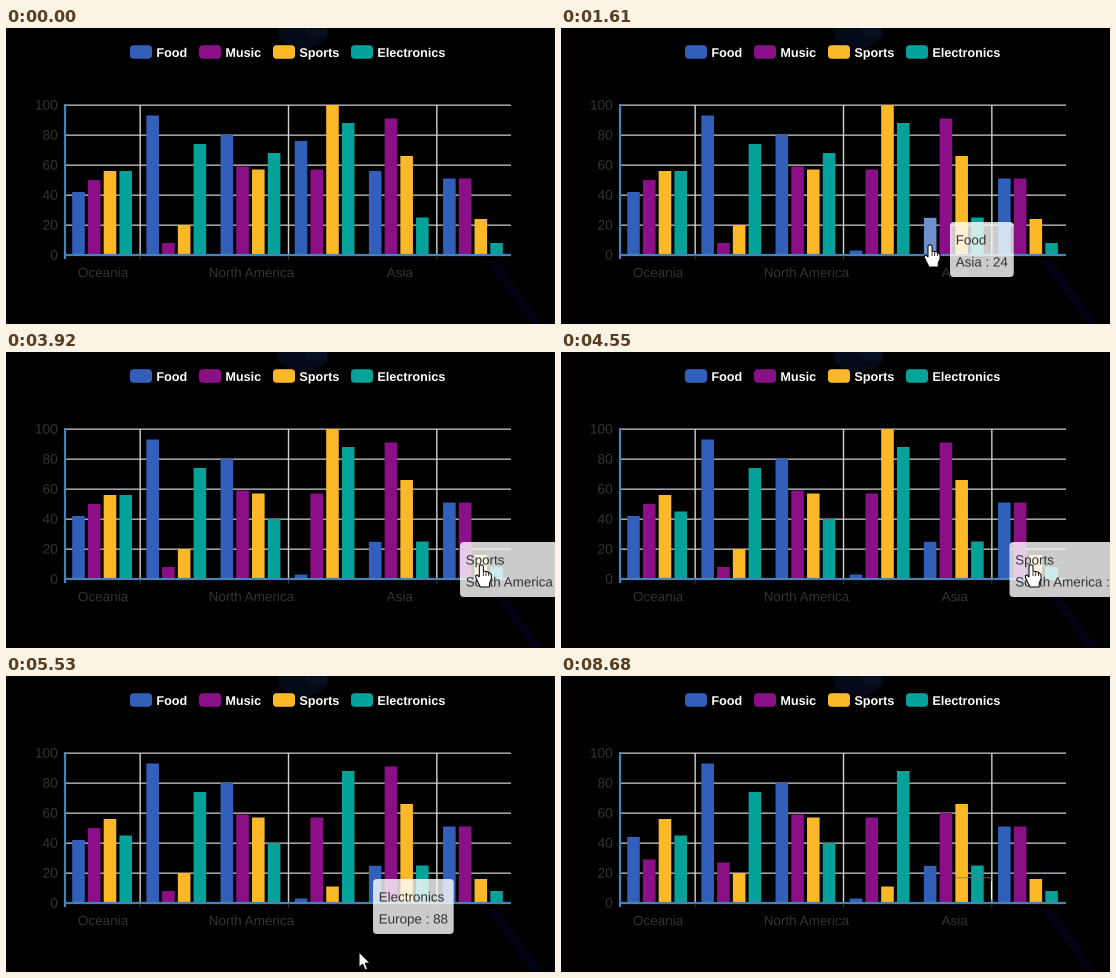
Write a matplotlib script that moves like this. It is 549 by 296 pixels and loops after 8890 ms.

```python
import matplotlib.pyplot as plt
import numpy as np
from matplotlib.animation import FuncAnimation
from matplotlib.colors import to_rgb
from matplotlib.patches import FancyBboxPatch, PathPatch, Polygon, Rectangle
from matplotlib.path import Path
from matplotlib.textpath import TextPath

W, H, DPI = 549, 296, 72          # at 72 dpi a point is a pixel
STEP, LOOP = 70, 8890
plt.rcParams["toolbar"] = "None"

SERIES = ["Food", "Music", "Sports", "Electronics"]
COLORS = ["#315fba", "#8b0f87", "#fcb826", "#04a299"]
SALES = {
    "Oceania": [42, 50, 56, 56],
    "Africa": [93, 8, 20, 74],
    "North America": [80, 59, 57, 68],
    "Europe": [76, 57, 100, 88],
    "Asia": [56, 91, 66, 25],
    "South America": [51, 51, 24, 8],
}
REGIONS = list(SALES)

# one value changes at every beat: region, series, new value
FIRST_BEAT, BEAT = 616, 895
UPDATES = [
    ("Asia", 0, 24.8), ("Europe", 0, 3), ("South America", 2, 16),
    ("North America", 3, 40), ("Oceania", 3, 45), ("Europe", 2, 11),
    ("Africa", 1, 27), ("Oceania", 0, 44), ("Oceania", 1, 29), ("Asia", 1, 60),
]

# stops of the pointer on each visit: time, x, y
VISITS = [
    np.array([
        (910, 438, 291), (1050, 434, 266), (1120, 434, 266), (1470, 381, 222),
        (1540, 369, 217), (3220, 369, 217), (3850, 475.5, 213), (4480, 470, 213),
        (4550, 470, 213), (4970, 347, 226), (5530, 353, 276), (5740, 353, 276),
    ]),
    np.array([(7770, 471, 289), (8190, 432, 240), (8400, 430, 204)]),
]
TIP_HIDE = 5670

LEFT, RIGHT, BASE, TOP = 60, 505, 227, 77
BAND = (RIGHT - LEFT) / len(REGIONS)
BAR_STEP = BAND * 0.8 / 3.77
BAR_W = BAR_STEP * 0.8
TIP_H, PAD = 55, 6

ARROW = [(0, 0), (0, 15.5), (3.6, 12.2), (6.2, 18), (8.6, 17), (6.2, 11.2), (11, 11)]
HAND = [(-1, 0), (1, 0), (2, 1), (2, 6), (7, 7), (10, 9.5), (10, 14), (8.2, 18),
        (8.2, 22), (-1, 22), (-5.4, 13), (-5.6, 10.5), (-4, 10), (-2, 12), (-2, 1)]


def bar_x(region, series):
    return LEFT + 6.2 + region * BAND + series * BAR_STEP


def value_y(value):
    return BASE - value * (BASE - TOP) / 100


def values_at(t):
    data = [list(row) for row in SALES.values()]
    for k, (region, series, value) in enumerate(UPDATES):
        if t >= STEP * round((FIRST_BEAT + k * BEAT) / STEP):
            data[REGIONS.index(region)][series] = value
    return data


def pointer_at(t):
    """Glide from stop to stop with a soft start and end."""
    for stops in VISITS:
        times = stops[:, 0]
        if times[0] <= t <= times[-1]:
            i = min(np.searchsorted(times, t, side="right"), len(times) - 1)
            u = (t - times[i - 1]) / (times[i] - times[i - 1])
            u = u * u * (3 - 2 * u)
            return stops[i - 1, 1:] * (1 - u) + stops[i, 1:] * u
    return None


def hovered(t):
    pos = pointer_at(t)
    if pos is None:
        return None
    x, y = pos
    for r, row in enumerate(values_at(t)):
        for s, value in enumerate(row):
            if 0 <= x - bar_x(r, s) <= BAR_W and value_y(value) <= y <= BASE:
                return r, s
    return None


def tooltip_at(t):
    """Bar and anchor of the tooltip: it trails the pointer and stays after it leaves."""
    if t >= TIP_HIDE:
        return None
    last = t
    while pointer_at(last) is not None:
        bar = hovered(last)
        if bar:
            trailing = last == t and hovered(t - STEP)
            return bar, pointer_at(t - STEP if trailing else last)
        last -= STEP
    return None


def lighten(color, amount=0.3):
    return tuple(c + (1 - c) * amount for c in to_rgb(color))


def glyphs(text, size=13.4, weight="normal"):
    """Outline of the text, y down, middle of the capitals at 0, and its width."""
    path = TextPath((0, 0), text, size=size,
                    prop={"family": "Liberation Sans", "weight": weight})
    points = path.vertices * [1, -1] + [0, 0.36 * size]
    return Path(points, path.codes), path.get_extents().x1


def moved(path, x, y):
    return Path(path.vertices + [x, y], path.codes)


fig = plt.figure(figsize=((W + 0.01) / DPI, (H + 0.01) / DPI), dpi=DPI, facecolor="black")
ax = fig.add_axes([0, 0, 1, 1])
ax.set_xlim(0, W)
ax.set_ylim(H, 0)
ax.axis("off")


def line(xs, ys, color, lw, z):
    return ax.plot(xs, ys, color=color, lw=lw, zorder=z,
                   solid_capstyle="butt", snap=False)[0]


def label(x, y, text, align=0, color="#333333", z=3, **font):
    path, width = glyphs(text, **font)
    return ax.add_patch(PathPatch(moved(path, x - align * width, y),
                                  fc=color, lw=0, zorder=z, snap=False))


def rounded(x, y, w, h, r, **kw):
    return ax.add_patch(FancyBboxPatch(
        (x, y), w, h, lw=0, boxstyle=f"round,pad=0,rounding_size={r}", **kw))


def shape(points, color):
    ax.add_patch(Polygon(points, closed=True, fc=color, lw=0, zorder=0))


# faint backdrop
shape([(272, 0), (273, 10), (284, 18), (300, 21), (314, 16), (322, 9), (322, 0)], "#040a18")
shape([(299, 0), (303, 9), (320, 8), (321, 0)], "#061022")
shape([(480, 233), (492, 233), (537, 296), (526, 296)], "#020212")

# legend
for name, color, x in zip(SERIES, COLORS, (124, 193, 267, 345)):
    rounded(x, 17.2, 22, 13.6, 3.8, fc=color, zorder=3)
    label(x + 26.4, 24.4, name, color="white", size=12.6, weight="bold")

# grid and axes
for value in range(0, 101, 20):
    y = value_y(value)
    if value:
        line([LEFT, RIGHT], [y + 0.2] * 2, "#a0a0a0", 1.6, 1)
    label(51.3, y - 0.3, str(value), align=1, size=13.8)
for i in range(len(REGIONS)):
    x = LEFT + i * BAND
    if i % 2:
        line([x] * 2, [TOP, BASE], "#d0d0d0", 1.4, 1.1)
        line([x] * 2, [BASE, BASE + 5], "#333333", 1, 2)
    else:
        label(x + BAND / 2, 244.3, REGIONS[i], align=0.5, size=13.5)
line([58, RIGHT], [BASE] * 2, "#4583b8", 2.2, 3)
line([59] * 2, [TOP - 1, BASE + 4], "#4583b8", 2.2, 3)

bars = [[ax.add_patch(Rectangle((bar_x(r, s), BASE), BAR_W, 0, lw=0, zorder=2, snap=False))
         for s in range(4)] for r in range(6)]

# traces that stay where the pointer went away
traces = [line([395, 430], [201.8] * 2, "#6c7488", 0.8, 4),
          line([430.4] * 2, [205, 223], "white", 1, 4)]

tip_box = rounded(0, 0, 10, TIP_H, 4, fc="white", alpha=0.8, zorder=5)
tip_lines = [label(0, 0, "-", z=6) for _ in range(2)]

pointer = ax.add_patch(Polygon(ARROW, closed=True, fc="white", ec="black", lw=1, zorder=8))
knuckles = [line([0, 0], [0, 0], "black", 0.8, 9) for _ in range(3)]


def draw_bars(t):
    lit = hovered(t)
    for r, row in enumerate(values_at(t)):
        for s, value in enumerate(row):
            y = value_y(value)
            bars[r][s].set_y(y)
            bars[r][s].set_height(BASE - y)
            bars[r][s].set_facecolor(lighten(COLORS[s]) if lit == (r, s) else COLORS[s])


def draw_tooltip(t):
    tip = tooltip_at(t)
    for artist in (tip_box, *tip_lines):
        artist.set_visible(tip is not None)
    if tip is None:
        return
    (r, s), (x, y) = tip
    texts = [glyphs(SERIES[s]), glyphs(f"{REGIONS[r]} : {int(values_at(t)[r][s])}")]
    width = max(w for _, w in texts) + 2 * PAD
    left = x + 20 if x + 20 + width < 560 else x - 21.5
    top = y - 23
    tip_box.set_bounds(left, top, width, TIP_H)
    for i, (path, _) in enumerate(texts):
        tip_lines[i].set_path(moved(path, left + PAD - 0.3, top + 17.7 + 22 * i))


def draw_pointer(t):
    pos = pointer_at(t)
    over = hovered(t) is not None
    pointer.set_visible(pos is not None)
    for i, knuckle in enumerate(knuckles):
        knuckle.set_visible(over)
        if over:
            x = pos[0] + 2 + 2.7 * i
            knuckle.set_data([x, x], [pos[1] + 6.5 + i * 0.6, pos[1] + 11])
    if pos is not None:
        pointer.set_xy(np.array(HAND if over else ARROW) + pos)


def draw(frame):
    t = frame * STEP
    draw_bars(t)
    draw_tooltip(t)
    draw_pointer(t)
    for trace in traces:
        trace.set_visible(t > VISITS[-1][-1, 0])
    return []


anim = FuncAnimation(fig, draw, frames=LOOP // STEP, interval=STEP,
                     init_func=lambda: draw(0), repeat=True, repeat_delay=0, blit=False)
plt.show()
```
